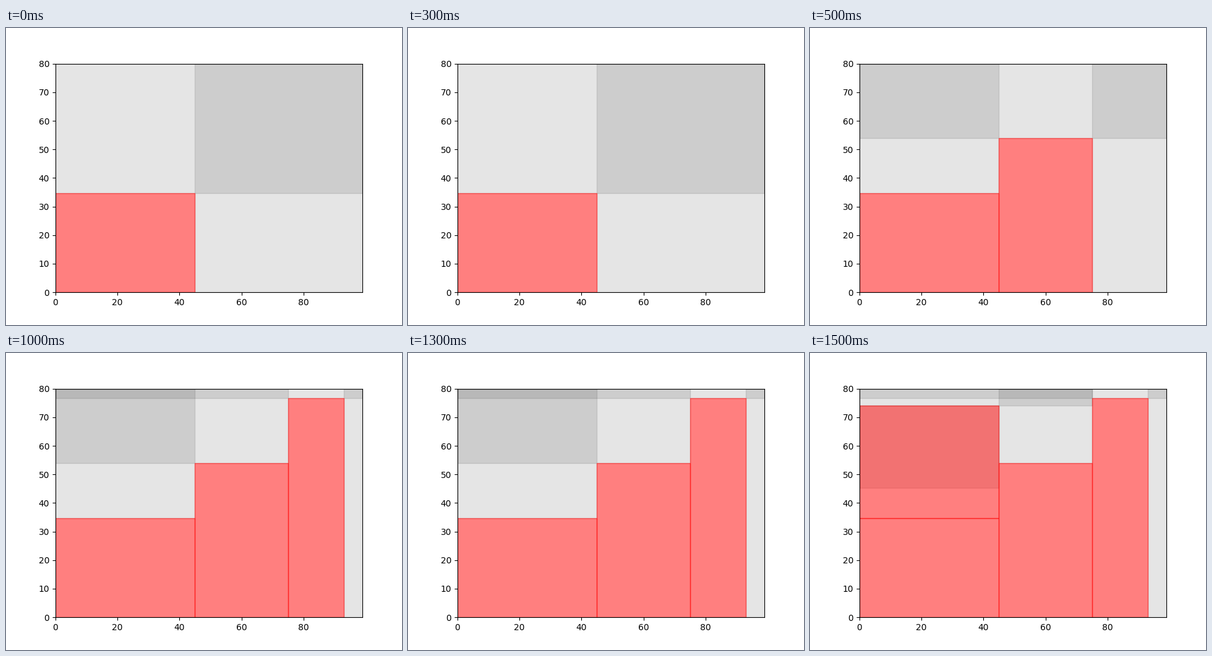
A matplotlib script that plays this animation: 640 by 480 pixels, repeating every 2000 ms.

```python
import matplotlib.pyplot as plt
from matplotlib.animation import FuncAnimation
from matplotlib.patches import Rectangle

W, H = 99, 80
H1, H2, H3, H4 = 34.67, 54, 76.67, 74   # top edges of the placed boxes
X1, X2, X3 = 45, 75, 93                 # right edges of the placed boxes

# Boxes as (left, bottom, right, top), one more placed per step
PLACED = [
    (0, 0, X1, H1),
    (X1, 0, X2, H2),
    (X2, 0, X3, H3),
    (0, H1, X1, H4),
]

# Free areas left after each step
FREE = [
    [(X1, 0, W, H), (0, H1, W, H)],
    [(X2, 0, W, H), (0, H1, X1, H), (0, H2, W, H)],
    [(X3, 0, W, H), (0, H1, X1, H), (0, H2, X2, H), (0, H3, W, H)],
    [(X3, 0, W, H), (0, H3, W, H), (X1, H2, X2, H), (0, H4, X2, H),
     (0, H - H1, X1, H4)],
]

fig, ax = plt.subplots(figsize=(6.4, 4.8), dpi=100)
ax.set_xlim(0, W)
ax.set_ylim(0, H)


def add_box(box, color, alpha):
    left, bottom, right, top = box
    ax.add_patch(Rectangle((left, bottom), right - left, top - bottom,
                           color=color, alpha=alpha, linewidth=1))


def draw(step):
    for patch in list(ax.patches):
        patch.remove()
    for box in FREE[step]:
        add_box(box, "black", 0.1)
    for box in PLACED[:step + 1]:
        add_box(box, "red", 0.5)
    return ax.patches


anim = FuncAnimation(fig, draw, frames=len(PLACED), interval=500,
                     init_func=lambda: [], repeat=True, repeat_delay=0)
plt.show()
```
